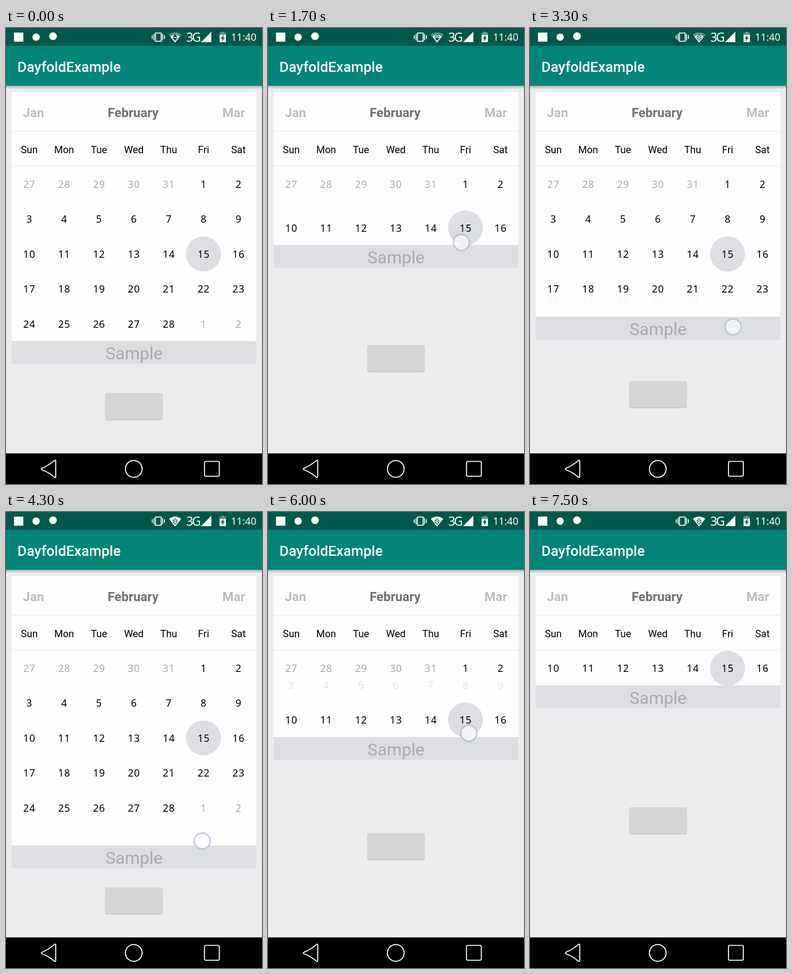
Animation of 561 by 998 pixels, one loop 8 s. Source, as an HTML page:

```html
<!DOCTYPE html>
<html lang="en">
<head>
<meta charset="utf-8">
<title>Calendar</title>
<style>
  html, body { margin: 0; width: 100%; height: 100%; overflow: hidden; background: #ecebee; }
  svg { display: block; width: 561px; height: 998px; }
  text { font-family: Roboto, sans-serif; }
  .mid { text-anchor: middle; }
  .month { font-size: 28px; font-weight: 700; fill: #bdbcc0; }
  .day { font-size: 21.8px; }
  .date, .status { font-family: "Noto Sans", "Open Sans", sans-serif; font-size: 21.8px; }
  .date { letter-spacing: 1px; }
  .pale { fill: #aaa9ac; }
</style>
</head>
<body>
<svg viewBox="0 0 561 998">
  <defs>
    <linearGradient id="shade" x2="0" y2="1">
      <stop stop-color="#000" stop-opacity=".25"/>
      <stop offset="1" stop-color="#000" stop-opacity="0"/>
    </linearGradient>
    <clipPath id="clip"><rect id="clipBox" x="12.5" y="303" width="536" height="382"/></clipPath>
  </defs>
  <rect width="561" height="998" fill="#ecebee"/>
  <rect y="126" width="561" height="8" fill="url(#shade)"/>
  <rect width="561" height="126.5" fill="#008577"/>
  <rect width="561" height="39" fill="#00574b"/>
  <text x="25" y="95.5" font-size="31.2" font-weight="500" fill="#fff">DayfoldExample</text>

  <g fill="#fff">
    <rect x="17.5" y="10" width="20.5" height="20"/>
    <circle cx="66" cy="20" r="8"/>
    <circle cx="103" cy="18" r="8.5"/>
    <path d="M320.5 16v8M324.5 13v14M343 13v14M347 16v8M327.5 11h12.5v18h-12.5z" fill="none" stroke="#fff" stroke-width="2"/>
    <path d="M357 15Q370.500 5 384 15L370.500 32z"/>
    <path id="dim" d="M357 15Q370.500 5 384 15L380.500 19Q370.500 11 360.500 19z" fill="#5b948b"/>
    <g stroke="#00574b" stroke-width="1.2">
      <path id="up" d="M366 19.500L370.500 14.500L375 19.500z"/>
      <path id="down" d="M366 22L370.500 27L375 22z"/>
    </g>
    <text class="status" x="395" y="30" style="font-size:27px;font-weight:300;letter-spacing:-3px">3G</text>
    <path d="M427.500 31L450 8V31z"/>
    <path d="M468 15h14v16h-14z"/>
    <path d="M472 8h6v2h4v5h-14v-5h4z" fill="#5b948b"/>
    <path d="M477 15L470.500 23H474L473 29L479.500 21H476z" fill="#00574b"/>
    <text class="status" x="493" y="28" font-weight="500">11:40</text>
  </g>

  <rect id="card" x="12.5" y="140" width="536" height="545" fill="#fefdff"/>
  <text class="month" x="37" y="194.500">Jan</text>
  <text class="month mid" x="278.500" y="194.500" style="fill:#706f72">February</text>
  <text class="month" x="524" y="194.500" text-anchor="end">Mar</text>
  <path d="M12.500 226h536M12.500 302h536" stroke="#f0eff2" stroke-width="2"/>
  <g id="days"></g>
  <g id="rows" clip-path="url(#clip)"></g>
  <g id="bar">
    <rect x="12.5" width="536" height="50" fill="#dcdee1"/>
    <text class="mid pale" x="280.500" y="40" font-size="37.4">Sample</text>
  </g>
  <g id="button">
    <rect x="217.500" y="-27.500" width="126" height="58" rx="4" fill="#c4c3c6"/>
    <rect x="217.500" y="-29" width="126" height="58" rx="3" fill="#d5d4d7"/>
  </g>
  <g id="touch">
    <circle r="18.500" fill="none" stroke="#8d9bd0" stroke-opacity=".2" stroke-width="3"/>
    <circle r="17" fill="#fefdff" fill-opacity=".68" stroke="#b0b9dc" stroke-width="1.800"/>
  </g>
  <rect y="931" width="561" height="67"/>
  <g fill="none" stroke="#fff" stroke-width="2.200" stroke-linejoin="round">
    <path d="M79 963.500Q94 957 107 946Q109 945 109 948V981Q109 985 106 983Q93 972 79 967Q76 965 79 963.500z"/>
    <circle cx="280" cy="965" r="18.300"/>
    <rect x="435" y="948.500" width="32.500" height="32.500" rx="3"/>
  </g>
</svg>
<script>
const el = id => document.getElementById(id);
const LOOP = 8000, ROW = 76.4, TOP = 303;
const colX = i => 51 + ROW * i;

// How far the sheet is folded up: [ms, px]; negative means pulled past the last week.
const fold = [
  [600, 0], [700, -12], [1100, -159.5], [1200, -172], [1300, -172], [1800, 305.5],
  [2600, 305.5], [2700, 282], [3300, 53], [3400, 27], [3600, 6], [3900, 0],
  [4100, 0], [4200, -22], [4300, -45], [4400, -45], [5000, 49], [5300, 121],
  [6000, 192.5], [6200, 222], [7000, 305.5]
];
// Finger: [ms, x, y, opacity]
const finger = [
  [600, 425, 700, 0], [700, 425, 700, 1], [1100, 411, 845, 1], [1200, 411, 858, 1],
  [1300, 411, 858, 1], [1900, 430, 275, 1], [2000, 430, 275, 0],
  [2500, 433, 424.5, 0], [2600, 433, 424.5, 1], [2700, 433, 440, 1],
  [3300, 445, 654, 1], [3400, 446, 680, 1], [3500, 446, 680, 0],
  [4100, 430, 695, 0], [4200, 430, 695, 1], [4300, 430, 720, 1], [4400, 430, 720, 1],
  [5000, 433.5, 630, 1], [5300, 436, 555, 1], [6000, 440, 484, 1],
  [6200, 441, 455, 1], [7100, 441.5, 356, 1], [7200, 441.5, 356, 1], [7500, 441.5, 356, 0]
];

function at(track, t) {
  const i = track.findIndex(k => k[0] > t);
  if (i === 0) return track[0].slice(1);
  if (i < 0) return track[track.length - 1].slice(1);
  const a = track[i - 1], b = track[i], p = (t - a[0]) / (b[0] - a[0]);
  return a.slice(1).map((v, j) => v + (b[j + 1] - v) * p);
}

el("days").innerHTML = ["Sun", "Mon", "Tue", "Wed", "Thu", "Fri", "Sat"]
  .map((d, i) => `<text class="day mid" x="${colX(i)}" y="274">${d}</text>`).join("");

function week(r) {
  let s = r === 2 ? `<circle cx="432.800" cy="494.500" r="38.300" fill="#dcdee1"/>` : "";
  for (let c = 0; c < 7; c++) {
    const n = r * 7 + c - 4;
    const date = n < 1 ? n + 31 : n > 28 ? n - 28 : n;
    const pale = n !== date ? " pale" : "";
    s += `<text class="date mid${pale}" x="${colX(c) + .3}" y="${350 + ROW * r}">${date}</text>`;
  }
  return `<g>${s}</g>`;
}
el("rows").innerHTML = [0, 1, 2, 3, 4].map(week).join("");
const weeks = [...el("rows").children];
const foldStart = [3, 2, 2, 1, 0].map(n => n * ROW);

function move(id, x, y) {
  el(id).setAttribute("transform", `translate(${x} ${y})`);
}

function draw(t) {
  const [f] = at(fold, t), edge = 685 - f;
  weeks.forEach((g, r) => {
    const shift = Math.max(0, f - foldStart[r]);
    g.setAttribute("transform", `translate(0 ${-shift})`);
    g.setAttribute("opacity", r === 2 ? 1 : Math.max(0, 1 - shift / ROW) ** 3);
  });
  el("clipBox").setAttribute("height", edge - TOP);
  el("card").setAttribute("height", edge - 140);
  move("bar", 0, edge);
  move("button", 0, 828 - f / 2);

  const [x, y, o] = at(finger, t);
  move("touch", x, y);
  el("touch").setAttribute("opacity", o);

  const early = t < 500, busy = t >= 4500 && t < 5400;
  el("dim").setAttribute("opacity", t < 4200 ? 1 : 0);
  el("up").setAttribute("fill", early || busy ? "#00574b" : "#fff");
  el("down").setAttribute("fill", early || t < 2600 ? "#00574b" : "#fff");
}

const start = performance.now();
function tick() {
  const t = (performance.now() - start) % LOOP;
  draw(Math.floor(t / 100) * 100); // the screen updates ten times a second
  requestAnimationFrame(tick);
}
tick();
</script>
</body>
</html>
```
